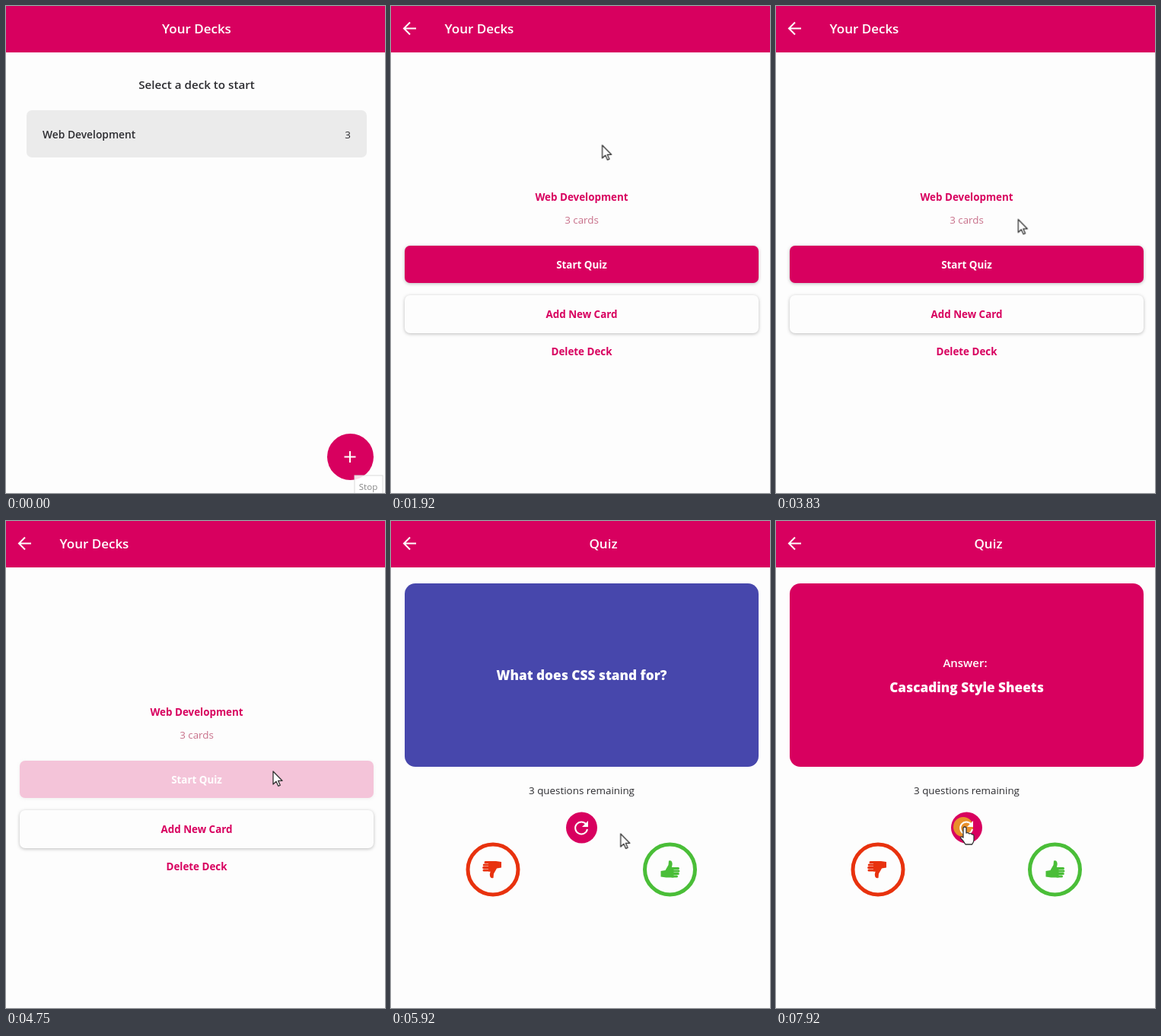
These frames come from a looping animation (498x640 px, 8000 ms). An HTML page:

```html
<!DOCTYPE html>
<html lang="en">
<head>
<meta charset="utf-8">
<title>Flashcards</title>
<style>
  :root { --pink: #d8005f; --paper: #fdfdfd; --light: #fff; }
  html, body { margin: 0; width: 100%; height: 100%; overflow: hidden; background: var(--paper); }
  svg { display: block; width: 498px; height: 640px; font: 600 13.6px "Open Sans", "Noto Sans", sans-serif; }
  text { text-anchor: middle; }
  .paper { fill: var(--paper); }
  .pink { fill: var(--pink); }
  .light { fill: var(--light); }
  .line { fill: none; stroke: var(--light); stroke-width: 2; }
  .title { font-size: 17px; fill: var(--light); }
  .dark { fill: #2c2c30; }
  .bold { font-weight: 700; font-size: 13.4px; }
  .plain { font-weight: 400; font-size: 13.4px; }
  .big { font-weight: 800; font-size: 17.2px; fill: var(--light); }
  .shadow { filter: drop-shadow(0 1px 2px #bbb); }
  .down { color: #e8320e; }
  .up { color: #4abe38; }
  .ring { fill: var(--paper); stroke: currentColor; stroke-width: 5; }

  /* every part shares one 8 s clock */
  .tip, .deck, .quiz, .item, .start, .front, .back, .glow, .cursor, .arrow, .hand {
    animation: 8s linear infinite;
  }
  .tip { animation-name: tip; }
  .deck { animation-name: deck; }
  .quiz { animation-name: quiz; }
  .item { animation-name: item; }
  .start { animation-name: start; }
  .front, .back { transform-box: fill-box; transform-origin: center; }
  .front { animation-name: front; }
  .back { animation-name: back; }
  .glow { animation-name: glow; }
  .cursor { animation-name: move; }
  .arrow { animation-name: arrow; animation-timing-function: step-end; }
  .hand { animation-name: hand; animation-timing-function: step-end; }

  @keyframes tip { 0%, .99% { opacity: 1 } 1%, 100% { opacity: 0 } }
  @keyframes deck { 0%, 20.6% { opacity: 0 } 23%, 100% { opacity: 1 } }
  @keyframes quiz { 0%, 60% { opacity: 0 } 62%, 100% { opacity: 1 } }
  @keyframes item { 0%, 16% { opacity: 1 } 17.8%, 18.8% { opacity: .3 } 21.5%, 100% { opacity: 1 } }
  @keyframes start { 0%, 57.5% { opacity: 1 } 59.2%, 100% { opacity: .22 } }
  @keyframes front {
    0%, 93.1% { transform: none; animation-timing-function: ease-in }
    94.8%, 100% { transform: scaleX(0) }
  }
  @keyframes back {
    0%, 94.8% { transform: scaleX(0); animation-timing-function: ease-out }
    96.9%, 100% { transform: none }
  }
  @keyframes glow { 0%, 88.4% { opacity: 0 } 88.8%, 100% { opacity: 1 } }
  @keyframes move {
    0%, 1% { transform: translate(462px, 650px) }
    3% { transform: translate(440px, 540px) }
    5% { transform: translate(392px, 378px) }
    7% { transform: translate(374px, 285px) }
    10.4% { transform: translate(282px, 172px) }
    12%, 20.8% { transform: translate(273px, 161px) }
    27.1%, 30.2% { transform: translate(282px, 204px) }
    31.2%, 37.5% { transform: translate(286px, 215px) }
    46.9%, 47.8% { transform: translate(318px, 280px) }
    57.3%, 67.7% { transform: translate(351px, 329px) }
    70.6% { transform: translate(384px, 478px) }
    74% { transform: translate(302px, 411px) }
    76%, 77.1% { transform: translate(262px, 422px) }
    81.2%, 82.3% { transform: translate(200px, 488px) }
    88.6%, 100% { transform: translate(248px, 402px) }
  }
  @keyframes arrow {
    0% { opacity: 1 } 10% { opacity: 0 } 21.5% { opacity: 1 } 53.5% { opacity: 0 }
    58.4% { opacity: 1 } 87.5%, 100% { opacity: 0 }
  }
  @keyframes hand {
    0% { opacity: 0 } 10% { opacity: 1 } 21.5% { opacity: 0 } 53.5% { opacity: 1 }
    58.4% { opacity: 0 } 87.5%, 100% { opacity: 1 }
  }
</style>
</head>
<body>
<svg viewBox="0 0 498 640">
  <defs>
    <g id="base">
      <rect class="paper" width="498" height="640"/>
      <rect class="pink" width="498" height="61"/>
    </g>
    <path id="left" class="line" d="M33 29.5H17.5M25 21.5L17 29.5L25 37.5"/>
    <g id="thumb" fill="currentColor">
      <path d="M-12 2L-6 1L-2 -6L-1.5 -11.5Q3 -13 3.2 -7L2.4 -3H5V10.5H-5L-12 9.5Z"/>
      <path fill="none" stroke="currentColor" stroke-width="3" stroke-linecap="round"
        d="M3 -1.4H11M3 2.1H11.4M3 5.6H10.8M3 9.1H9"/>
    </g>
  </defs>

  <g class="home">
    <use href="#base"/>
    <text class="title" x="250.5" y="36">Your Decks</text>
    <text class="dark" x="250.5" y="109" font-size="15.2">Select a deck to start</text>
    <g class="item">
      <rect x="27" y="137" width="447" height="62" rx="7" fill="#ebebeb"/>
      <text class="dark" x="48" y="174" font-size="13.8" style="text-anchor:start">Web Development</text>
      <text class="dark plain" x="449" y="174">3</text>
    </g>
    <circle class="pink" cx="452.5" cy="592.5" r="30.5"/>
    <path class="line" d="M444.5 592.5H459.5M452 585V600"/>
    <g class="tip">
      <rect x="458" y="617" width="37" height="30" fill="#fff" fill-opacity=".85" stroke="#dadada"/>
      <text x="476" y="636" fill="#858585" font-size="11.5" font-weight="400">Stop</text>
    </g>
  </g>

  <g class="deck">
    <use href="#base"/>
    <use href="#left"/>
    <text class="title" x="116" y="36">Your Decks</text>
    <text class="bold pink" x="250.5" y="256">Web Development</text>
    <text class="plain" x="250.5" y="286" fill="#c8708a">3 cards</text>
    <g class="start">
      <rect class="pink shadow" x="18" y="315" width="465" height="49" rx="7"/>
    </g>
    <rect class="paper shadow" x="18" y="380" width="465" height="50" rx="7"/>
    <text class="bold light" x="250.5" y="345">Start Quiz</text>
    <text class="bold pink" x="250.5" y="410">Add New Card</text>
    <text class="bold pink" x="250.5" y="459">Delete Deck</text>
  </g>

  <g class="quiz">
    <use href="#base"/>
    <use href="#left"/>
    <text class="title" x="279" y="36">Quiz</text>
    <g class="front">
      <rect x="18" y="82" width="465" height="241" rx="14" fill="#4747ac"/>
      <text class="big" x="250.5" y="209">What does CSS stand for?</text>
    </g>
    <g class="back">
      <rect class="pink" x="18" y="82" width="465" height="241" rx="14"/>
      <text class="light" x="248.5" y="192" font-size="15">Answer:</text>
      <text class="big" x="250.5" y="225">Cascading Style Sheets</text>
    </g>
    <text class="plain dark" x="250.5" y="358.5">3 questions remaining</text>
    <circle class="pink" cx="250.5" cy="403" r="20.5"/>
    <circle class="glow" cx="246" cy="402" r="13" fill="#e8902a"/>
    <path class="line" d="M256.5 398.5A8 8 0 1 0 258 405"/>
    <path class="light" d="M259 394V402H251Z"/>
    <g class="down" transform="translate(134 458)">
      <circle class="ring" r="33"/>
      <use href="#thumb" transform="translate(-1 -.5) rotate(180) scale(1 -1) scale(1 -1)"/>
    </g>
    <g class="up" transform="translate(366.5 458)">
      <circle class="ring" r="33"/>
      <use href="#thumb"/>
    </g>
  </g>

  <g class="cursor" fill="#fff" stroke="#333" stroke-width="1.3" stroke-linejoin="round">
    <path class="arrow" d="M0 0V17L4 13.3L6.8 19.3L9.3 18.2L6.6 12.3H12Z"/>
    <path class="hand" d="M-2 2Q-2 0 0 0T2 2V8Q4.500 7 6 9Q8.500 8 9.500 10Q12 9.500 12 12V17Q12 20 9.500 23H1Q-1 19 -5.500 14.500Q-5.500 11.500 -2 14Z"/>
  </g>
</svg>
</body>
</html>
```
